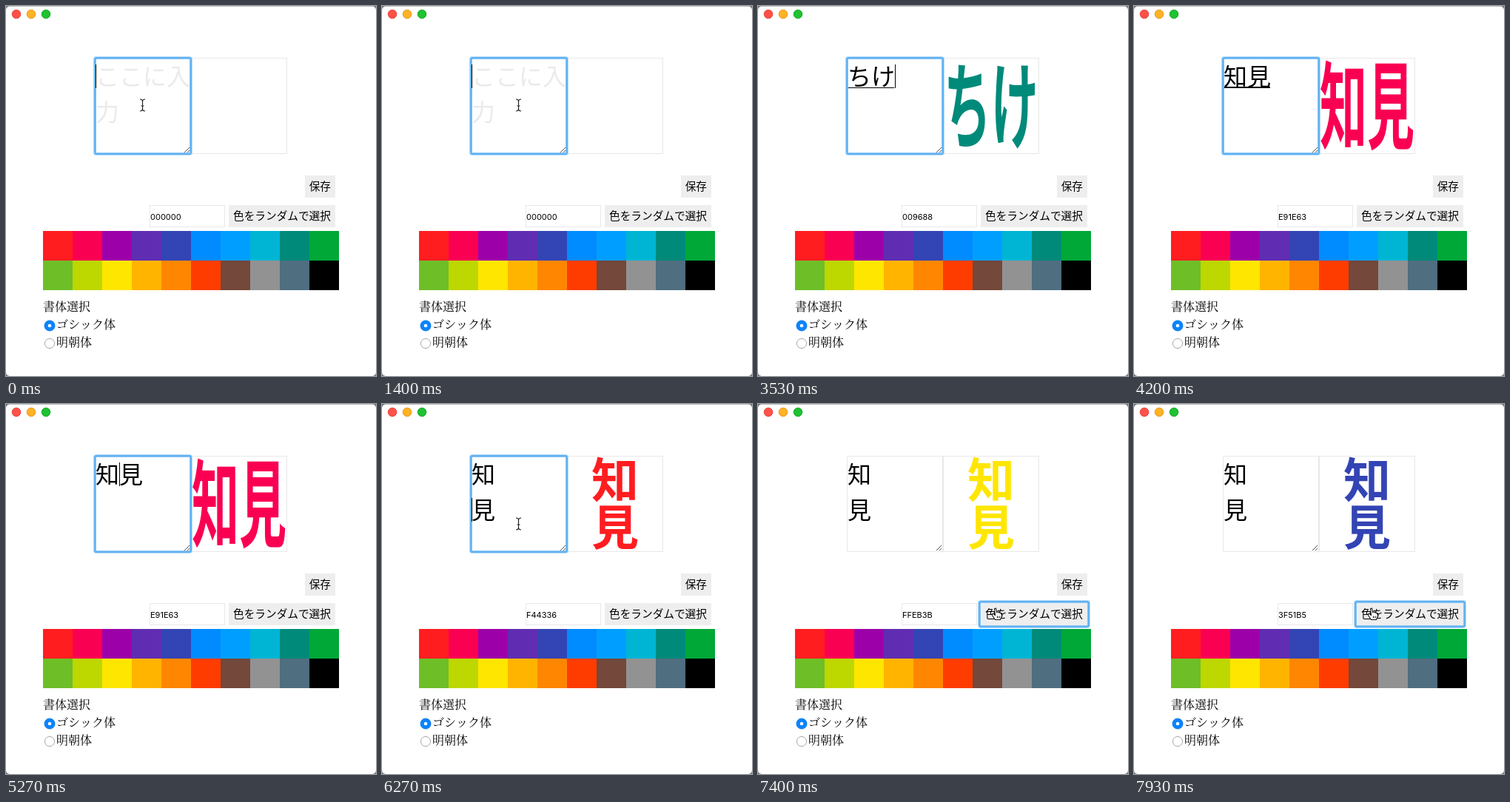
An HTML page with a canvas that plays this animation: 500x500 px, repeating every 8 s.

```html
<!DOCTYPE html>
<html lang="ja">
<head>
<meta charset="utf-8">
<title>文字画像</title>
<style>
html, body { margin: 0; width: 100%; height: 100%; overflow: hidden; background: #fff; }
canvas { display: block; width: 500px; height: 500px; }
</style>
</head>
<body>
<canvas id="stage"></canvas>
<script>
const LOOP = 8000;
const SANS = '"Noto Sans CJK JP", "Noto Sans CJK", sans-serif';
const MINCHO = '"Noto Serif CJK JP", "Noto Sans CJK JP", serif';
const canvas = document.getElementById('stage');
const ctx = canvas.getContext('2d');
const dpr = window.devicePixelRatio || 1;
canvas.width = canvas.height = 500 * dpr;

// hex code in the field -> colour on screen
const palette = {
  F44336: '#ff1d20', E91E63: '#fa0053', '9C27B0': '#9c00a9', '673AB7': '#602db2',
  '3F51B5': '#3344b4', '2196F3': '#008bff', '03A9F4': '#009fff', '00BCD4': '#00b5d4',
  '009688': '#008a7a', '4CAF50': '#00a838', '8BC34A': '#6ebe28', CDDC39: '#bdd700',
  FFEB3B: '#ffe600', FFC107: '#ffb400', FF9800: '#ff8600', FF5722: '#ff3c00',
  '795548': '#74483a', '9E9E9E': '#929292', '607D8B': '#4f6e80', '000000': '#000000'
};
const swatches = [
  'F44336 E91E63 9C27B0 673AB7 3F51B5 2196F3 03A9F4 00BCD4 009688 4CAF50',
  '8BC34A CDDC39 FFEB3B FFC107 FF9800 FF5722 795548 9E9E9E 607D8B 000000'
].map(row => row.split(' '));

// start time, text, colour code, underline thickness, caret column and row
const steps = [
  { at: 0, text: '', code: '000000', line: 0, caret: [0, 0] },
  { at: 2930, text: 'ｔ', code: '2196F3', line: 1, caret: [1, 0] },
  { at: 3070, text: 'ち', code: 'FF9800', line: 1, caret: [1, 0] },
  { at: 3270, text: 'ちｋ', code: '673AB7', line: 1, caret: [2, 0] },
  { at: 3400, text: 'ちけ', code: '009688', line: 1, caret: [2, 0] },
  { at: 3600, text: 'ちけｎ', code: '8BC34A', line: 1, caret: [3, 0] },
  { at: 3730, text: 'ちけん', code: '03A9F4', line: 1, caret: [3, 0] },
  { at: 4000, text: '知見', code: 'E91E63', line: 2, caret: null },
  { at: 4600, text: '知見', code: 'E91E63', line: 0, caret: [2, 0] },
  { at: 5200, text: '知見', code: 'E91E63', line: 0, caret: [1, 0] },
  { at: 5670, text: '知\n見', code: 'F44336', line: 0, caret: [0, 1] },
  { at: 7000, text: '知\n見', code: '00BCD4', line: 0, caret: null },
  { at: 7330, text: '知\n見', code: 'FFEB3B', line: 0, caret: null },
  { at: 7670, text: '知\n見', code: '3F51B5', line: 0, caret: null }
];

function rect(x, y, w, h, color) {
  ctx.fillStyle = color;
  ctx.fillRect(x, y, w, h);
}

function box(x, y, w, h, color) {
  ctx.strokeStyle = color;
  ctx.lineWidth = 1;
  ctx.strokeRect(x + .5, y + .5, w - 1, h - 1);
}

function text(str, x, y, font, color = '#000') {
  ctx.font = font;
  ctx.fillStyle = color;
  ctx.fillText(str, x, y);
}

function disc(x, y, r, fill, stroke) {
  ctx.beginPath();
  ctx.arc(x, y, r, 0, Math.PI * 2);
  ctx.fillStyle = fill;
  ctx.fill();
  if (stroke) {
    ctx.strokeStyle = stroke;
    ctx.lineWidth = 1;
    ctx.stroke();
  }
}

function focusRing(x, y, w, h) {
  for (const [grow, width, color] of [[.5, 4, '#b5dcfa'], [.2, 2.6, '#62b2f2']]) {
    ctx.beginPath();
    ctx.roundRect(x - grow, y - grow, w + 2 * grow, h + 2 * grow, 2);
    ctx.strokeStyle = color;
    ctx.lineWidth = width;
    ctx.stroke();
  }
}

function windowFrame() {
  rect(0, 0, 500, 500, '#747a7e');
  ctx.beginPath();
  ctx.roundRect(0, .5, 500, 499.5, 5);
  ctx.fillStyle = '#fff';
  ctx.fill();
  disc(14, 11, 5.8, '#ff5148', '#e6443c');
  disc(34, 11, 5.8, '#ffb224', '#e39c20');
  disc(54, 11, 5.8, '#1fc231', '#1bab2a');
}

function controls(code, buttonFocus) {
  rect(404, 229, 41, 30, '#eee');
  text('保存', 409.7, 249, `500 14.67px ${SANS}`);
  box(194, 269, 102, 30, '#e8e8e8');
  text(code, 195, 289, '11px Inter, sans-serif');
  rect(301, 269, 144, 30, '#eee');
  if (buttonFocus) focusRing(299.5, 267.5, 147, 33);
  text('色をランダムで選択', 307, 289, `500 14.67px ${SANS}`);
  swatches.forEach((row, j) => row.forEach((key, i) =>
    rect(50 + 40 * i, 304 + 40 * j, 40, 40, palette[key])));
  text('書体選択', 50, 412, `500 16px ${MINCHO}`);
  text('ゴシック体', 68, 436, `500 16px ${MINCHO}`);
  text('明朝体', 68, 460, `500 16px ${MINCHO}`);
  disc(59, 432, 7, '#0a84ff', '#0878ea');
  disc(59, 432, 2.3, '#fff');
  disc(59, 456, 6.6, '#fff', '#a8a8a8');
}

function editor(step, focused, caretOn) {
  box(120, 70, 130, 130, '#e8e8e8');
  if (focused) focusRing(120.5, 70.5, 129, 129);
  const lines = step.text ? step.text.split('\n') : ['ここに入', '力'];
  lines.forEach((str, i) => step.text
    ? text(str, 121, 107 + 48 * i, `32px ${SANS}`)
    : text(str, 121, 107 + 48 * i, `500 32px ${SANS}`, '#eaeaea'));
  if (step.line) rect(122, 111 - step.line, 32 * step.text.length - 2, step.line, '#000');
  if (step.caret && caretOn) {
    const [col, row] = step.caret;
    rect(121 + 32 * col, 79 + 48 * row, 1, 32, '#000');
  }
  ctx.beginPath();
  for (const d of [7, 3]) {
    ctx.moveTo(248 - d, 198);
    ctx.lineTo(248, 198 - d);
  }
  ctx.strokeStyle = '#555';
  ctx.lineWidth = 1;
  ctx.stroke();
}

// Every line fills an equal share of the square preview
function preview(step) {
  box(250, 70, 130, 130, '#e8e8e8');
  if (!step.text) return;
  const lines = step.text.split('\n');
  const cols = Math.max(...lines.map(s => s.length));
  const size = 128 / Math.max(cols, lines.length);
  const stretch = 128 / lines.length / size;
  ctx.save();
  ctx.translate(315, 70);
  ctx.scale(1, stretch);
  ctx.textAlign = 'center';
  lines.forEach((str, i) =>
    text(str, 0, size * (i + .88), `bold ${size}px ${SANS}`, palette[step.code]));
  ctx.restore();
}

function outline(points, close) {
  ctx.beginPath();
  points.forEach(([x, y]) => ctx.lineTo(x, y));
  if (close) ctx.closePath();
}

function beam() {
  for (const [color, width] of [['#fff', 3], ['#222', 1.2]]) {
    ctx.beginPath();
    ctx.moveTo(-3.5, -8);
    ctx.quadraticCurveTo(0, -8, 0, -5);
    ctx.lineTo(0, 5);
    ctx.quadraticCurveTo(0, 8, -3.5, 8);
    ctx.moveTo(3.5, -8);
    ctx.quadraticCurveTo(0, -8, 0, -5);
    ctx.moveTo(0, 5);
    ctx.quadraticCurveTo(0, 8, 3.5, 8);
    ctx.moveTo(-2, 1);
    ctx.lineTo(2, 1);
    ctx.strokeStyle = color;
    ctx.lineWidth = width;
    ctx.stroke();
  }
}

function arrow() {
  outline([[0, 0], [0, 15], [3.5, 12], [6, 17], [8, 16], [6, 11], [10.5, 11]], true);
  ctx.fillStyle = '#000';
  ctx.strokeStyle = '#fff';
  ctx.lineWidth = 1;
  ctx.fill();
  ctx.stroke();
}

function hand() {
  outline([[-3, -7], [-1, -7.5], [0, -2], [2, -2.5], [3, -1.5], [5, -1.5], [6, 0],
    [7, 1], [6.5, 4], [5, 8], [-2, 8], [-6, 2], [-6, 0], [-4, 0], [-2, 2]], true);
  ctx.lineJoin = 'round';
  ctx.fillStyle = '#fff';
  ctx.strokeStyle = '#111';
  ctx.lineWidth = 1.1;
  ctx.fill();
  ctx.stroke();
  outline([[1, 3], [1, 6]]);
  ctx.moveTo(3.5, 3);
  ctx.lineTo(3.5, 6);
  ctx.stroke();
}

function pointer(t) {
  if (t >= 2730 && t < 6130) return;
  let x = 184.5, y = 134;
  if (t >= 6130) {
    const p = Math.min(1, Math.max(0, (t - 6330) / 540));
    const e = p * p * (3 - 2 * p);
    y = 134 + 28 * Math.min(1, (t - 6130) / 140);
    x += 138 * e;
    y += 121.5 * e;
  }
  ctx.save();
  ctx.translate(x, y);
  if (x < 250 && y < 200) beam();
  else if (x > 301 && y > 269) hand();
  else arrow();
  ctx.restore();
}

function draw(t) {
  const step = steps.findLast(s => s.at <= t);
  const clicked = t >= 7000;
  const since = step.at ? t - step.at : t + 30;
  // blinking restarts after each key; the last pause is in its own phase
  const caretOn = Math.floor(since / 500) % 2 === 0 || (t >= 6130 && t < 6530);
  ctx.setTransform(dpr, 0, 0, dpr, 0, 0);
  ctx.textAlign = 'left';
  ctx.textBaseline = 'alphabetic';
  windowFrame();
  preview(step);
  editor(step, !clicked, caretOn);
  controls(step.code, clicked);
  pointer(t);
}

const start = performance.now();
function tick() {
  draw((performance.now() - start) % LOOP);
  requestAnimationFrame(tick);
}
tick();
</script>
</body>
</html>
```
